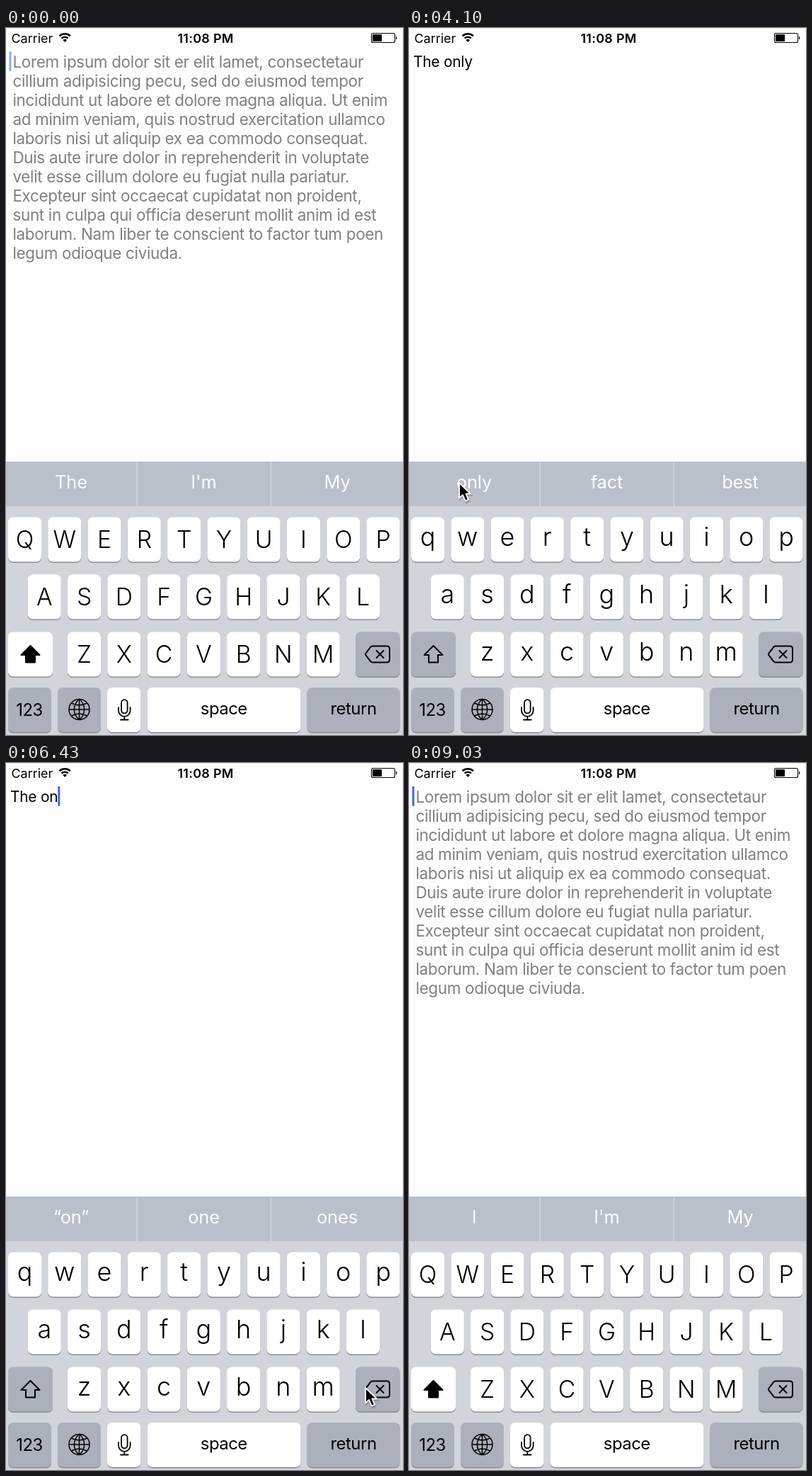
Recreate the animation shown at these times as an HTML page. Size 561 by 998 pixels, loop 9210 ms.

```html
<!DOCTYPE html>
<html lang="en">
<head>
<meta charset="utf-8">
<title>Text view with keyboard</title>
<style>
html, body { margin: 0; width: 100%; height: 100%; overflow: hidden; background: #fdfdfd; }
svg { display: block; width: 561px; height: 998px; }
text { font-family: Inter, "Liberation Sans", Arial, sans-serif; white-space: pre; }
.mid { text-anchor: middle; }
.status { font-size: 17.95px; }
.bold { font-weight: 600; letter-spacing: .3px; }
.hint { font-size: 22.44px; letter-spacing: -.31px; fill: #808080; }
.typed { font-size: 20.94px; letter-spacing: -.27px; }
.bar { font-size: 25.4px; letter-spacing: -.1px; fill: #fff; }
.upper { font-size: 33.7px; font-weight: 350; }
.lower { font-size: 36px; font-weight: 300; }
.word { font-size: 23.9px; letter-spacing: -.48px; }
.line { fill: none; stroke: #000; stroke-width: 2; stroke-linejoin: round; stroke-linecap: round; }
</style>
</head>
<body>
<svg id="stage" viewBox="0 0 561 998"></svg>
<script>
const LOOP = 9210;
const stage = document.getElementById('stage');

function add(parent, tag, attrs, label) {
  const el = document.createElementNS('http://www.w3.org/2000/svg', tag);
  for (const k in attrs) el.setAttribute(k, attrs[k]);
  if (label !== undefined) el.textContent = label;
  parent.append(el);
  return el;
}
const rect = (p, x, y, width, height, fill, rx = 0) => add(p, 'rect', { x, y, width, height, fill, rx });
const text = (p, x, y, cls, label) => add(p, 'text', { x, y, class: cls }, label);
const path = (p, d, attrs) => add(p, 'path', { d, ...attrs });

// Page
rect(stage, 0, 0, 561, 998, '#fdfdfd');
rect(stage, 0, 0, 561, 1, '#efefef');
rect(stage, 560, 0, 1, 612, '#f1f1f1');
rect(stage, 0, 0, 1, 612, '#f4f4f4');

// Status bar
text(stage, 7.5, 20.5, 'status', 'Carrier');
text(stage, 282, 20.5, 'status bold mid', '11:08 PM');
path(stage, 'M75.5 11.3a11.5 11.5 0 0 1 15.4 0M78.6 14.5a7 7 0 0 1 9.2 0', { class: 'line', style: 'stroke-width:2.5;stroke-linecap:butt' });
path(stage, 'M80.4 16.9a4.2 4.2 0 0 1 5.6 0L83.2 20z');
add(stage, 'rect', { x: 516.5, y: 7.5, width: 33, height: 13, rx: 2, class: 'line', style: 'stroke-width:1.1' });
rect(stage, 518, 9, 13, 10, '#000', 1);
path(stage, 'M551 11.5a2 2.6 0 0 1 0 5z');

// Text view
const hint = add(stage, 'g', {});
[
  'Lorem ipsum dolor sit er elit lamet, consectetaur',
  'cillium adipisicing pecu, sed do eiusmod tempor',
  'incididunt ut labore et dolore magna aliqua. Ut enim',
  'ad minim veniam, quis nostrud exercitation ullamco',
  'laboris nisi ut aliquip ex ea commodo consequat.',
  'Duis aute irure dolor in reprehenderit in voluptate',
  'velit esse cillum dolore eu fugiat nulla pariatur.',
  'Excepteur sint occaecat cupidatat non proident,',
  'sunt in culpa qui officia deserunt mollit anim id est',
  'laborum. Nam liber te conscient to factor tum poen',
  'legum odioque civiuda.'
].forEach((s, i) => text(hint, 9.4, 56.3 + i * 26.93, 'hint', s));
const typed = text(stage, 6, 55.3, 'typed', '');
const caret = rect(stage, 4.5, 33, 3, 28, '#4169db', 1.2);
const bubble = path(stage, 'M54 83H75L87 71.5Q89 69.5 91 71.5L103 83H124A11 11 0 0 1 135 94V126A11 11 0 0 1 124 137H54A11 11 0 0 1 43 126V94A11 11 0 0 1 54 83Z', { fill: '#eee' });

// Keyboard
const DARK = '#abb0bb';

function key(p, x, y, w, fill = '#fff') {
  rect(p, x, y + 2, w, 63, '#888b91', 7);
  return rect(p, x, y + .5, w, 63, fill, 7);
}

function keyboard(upper) {
  const g = add(stage, 'g', {});
  rect(g, 0, 675, 561, 323, '#d1d4db');
  [['qwertyuiop', 3, 690], ['asdfghjkl', 30.8, 771], ['zxcvbnm', 87, 852]].forEach(([letters, x0, y]) =>
    [...letters].forEach((c, i) => {
      const x = x0 + i * 56.28;
      key(g, x, y, 47);
      text(g, x + 23.5, y + (upper ? 44.3 : 41), (upper ? 'upper' : 'lower') + ' mid', upper ? c.toUpperCase() : c);
    }));
  key(g, 3, 852, 63, upper ? '#fff' : DARK);
  path(g, 'M34.5 872L47.5 885H41V895.5H28V885H21.5Z', { class: 'line', style: upper ? 'fill:#000' : '' });
  const del = key(g, 494, 852, 62.5, DARK);
  const delBody = path(g, 'M518 872.5H538Q542 872.5 542 876.5V891.5Q542 895.5 538 895.5H518Q516.5 895.5 515.4 894.4L508.5 885.4Q507.5 884 508.5 882.6L515.4 873.6Q516.5 872.5 518 872.5Z', { class: 'line' });
  const delCross = path(g, 'M523.5 879L533.5 889M533.5 879L523.5 889', { class: 'line' });
  key(g, 3, 930.5, 61, DARK);
  text(g, 33, 971, 'word mid', '123');
  key(g, 73, 930.5, 61, DARK);
  path(g, 'M89 962a14.5 14.5 0 1 0 29 0a14.5 14.5 0 1 0-29 0zH118M103.5 947.5V976.5M103.5 947.5C94 955 94 969 103.5 976.5C113 969 113 955 103.5 947.5M92.5 953Q103.5 959 114.5 953M92.5 971Q103.5 965 114.5 971', { class: 'line', style: 'stroke-width:1.5' });
  key(g, 143, 930.5, 47.5);
  path(g, 'M163 952.5a4.3 4.3 0 0 1 8.6 0V963a4.3 4.3 0 0 1-8.6 0zM159 959V963.5a8.3 8.3 0 0 0 16.6 0V959M167.3 972V976.5M162 976.5H172.6', { class: 'line', style: 'stroke-width:1.8' });
  key(g, 199.5, 930.5, 217);
  text(g, 307.8, 969, 'word mid', 'space');
  key(g, 425.5, 930.5, 131, DARK);
  text(g, 491, 969, 'word mid', 'return');
  return { g, del, delBody, delCross };
}
const boards = [keyboard(true), keyboard(false)];

// Suggestions
rect(stage, 0, 612, 561, 63, '#b9c0c9');
const cell = rect(stage, 0, 612, 185, 63, '#ebedf0');
rect(stage, 184.5, 613, 1.4, 62, '#d6dae0');
rect(stage, 373.7, 613, 1.4, 62, '#d6dae0');
const words = [92, 279.5, 468].map(x => text(stage, x, 650.3, 'bar mid', ''));

// Pointer, tip at its local origin
const pointer = add(stage, 'g', {});
path(pointer, 'M0 0V21.5L5 17L8.8 25.5L13 23.7L9.3 15.5H16Z', { fill: '#0003', transform: 'translate(1 2)', stroke: '#0002', 'stroke-width': 3 });
path(pointer, 'M0 0V21.5L5 17L8.8 25.5L13 23.7L9.3 15.5H16Z', { stroke: '#fff', 'stroke-width': 1.8, 'stroke-linejoin': 'round' });

// Timeline: [time, value...]
const TYPED = [[0, ''], [2900, 'The '], [4000, 'The only '], [5250, 'The only'], [6000, 'The onl'], [6250, 'The on'],
  [6560, 'The o'], [6720, 'The '], [6880, 'The'], [7040, 'Th'], [7200, 'T'], [7360, '']];
const WORDS = [[0, "The|I'm|My"], [3150, 'only|fact|best'], [4220, 'thing|way|one'], [5400, '“only”||'],
  [6330, '“on”|one|ones'], [7020, '“The”|They|There'], [7800, "I|I'm|My"]];
const TAPS = TYPED.slice(3).map(s => s[0]);
const BLINK = [[0, .55], [150, 1], [460, 1], [600, 0], [930, 0], [1170, 1], [1500, 1], [1700, 0], [1960, 0], [2030, 1],
  [4000, 1], [4001, 0], [4170, 0], [4260, 1], [8250, 1], [8430, 0], [8690, 0], [8870, 1], [9210, 1]];
const POINTER = [[2150, -16, 640], [2300, 36, 652], [2700, 82, 645], [3300, 82, 645], [3800, 71, 642], [4150, 71, 642],
  [4900, 493, 878], [5050, 508, 882], [7950, 508, 882], [8400, 566, 930]];

const step = (list, t) => list.filter(s => s[0] <= t).pop()[1];
const ramp = (t, a, b) => Math.min(1, Math.max(0, (t - a) / (b - a)));

function tween(list, t, ease = p => p) {
  const i = list.findIndex(s => s[0] > t);
  if (i < 1) return (i ? list[list.length - 1] : list[0]).slice(1);
  const [a, b] = [list[i - 1], list[i]];
  const p = ease(ramp(t, a[0], b[0]));
  return a.slice(1).map((v, k) => v + (b[k + 1] - v) * p);
}

function draw(t) {
  const str = step(TYPED, t);
  typed.textContent = str;
  hint.style.opacity = str ? 0 : 1;
  caret.setAttribute('x', str ? 6 + typed.getComputedTextLength() : 4.5);
  caret.style.opacity = tween(BLINK, t)[0];
  bubble.style.opacity = ramp(t, 5600, 5720) * (1 - ramp(t, 5860, 5960));

  const pressed = (t > 2840 && t < 2960) || (t > 3930 && t < 4050);
  cell.style.opacity = pressed ? 1 : 0;
  step(WORDS, t).split('|').forEach((w, i) => words[i].textContent = w);
  words[0].style.fill = pressed ? '#000' : '#fff';

  const low = ramp(t, 2950, 3250) - ramp(t, 7380, 7680);
  boards[0].g.style.opacity = 1 - low;
  boards[1].g.style.opacity = low;
  const down = TAPS.some(s => t >= s - 30 && t < s + 60);
  for (const { del, delBody, delCross } of boards) {
    del.setAttribute('fill', down ? '#fff' : DARK);
    delBody.style.fill = down ? '#000' : 'none';
    delCross.style.stroke = down ? '#fff' : '#000';
  }
  // the incoming layer lies on top
  const top = boards[t > 5000 ? 0 : 1].g;
  if (top.previousSibling !== boards[t > 5000 ? 1 : 0].g) boards[t > 5000 ? 1 : 0].g.after(top);

  const [x, y] = tween(POINTER, t, p => p * p * (3 - 2 * p));
  pointer.setAttribute('transform', `translate(${x} ${y})`);
  pointer.style.opacity = t > 2150 && t < 8400 ? 1 : 0;
}

const start = performance.now();
function frame() {
  draw((performance.now() - start) % LOOP);
  requestAnimationFrame(frame);
}
frame();
</script>
</body>
</html>
```
